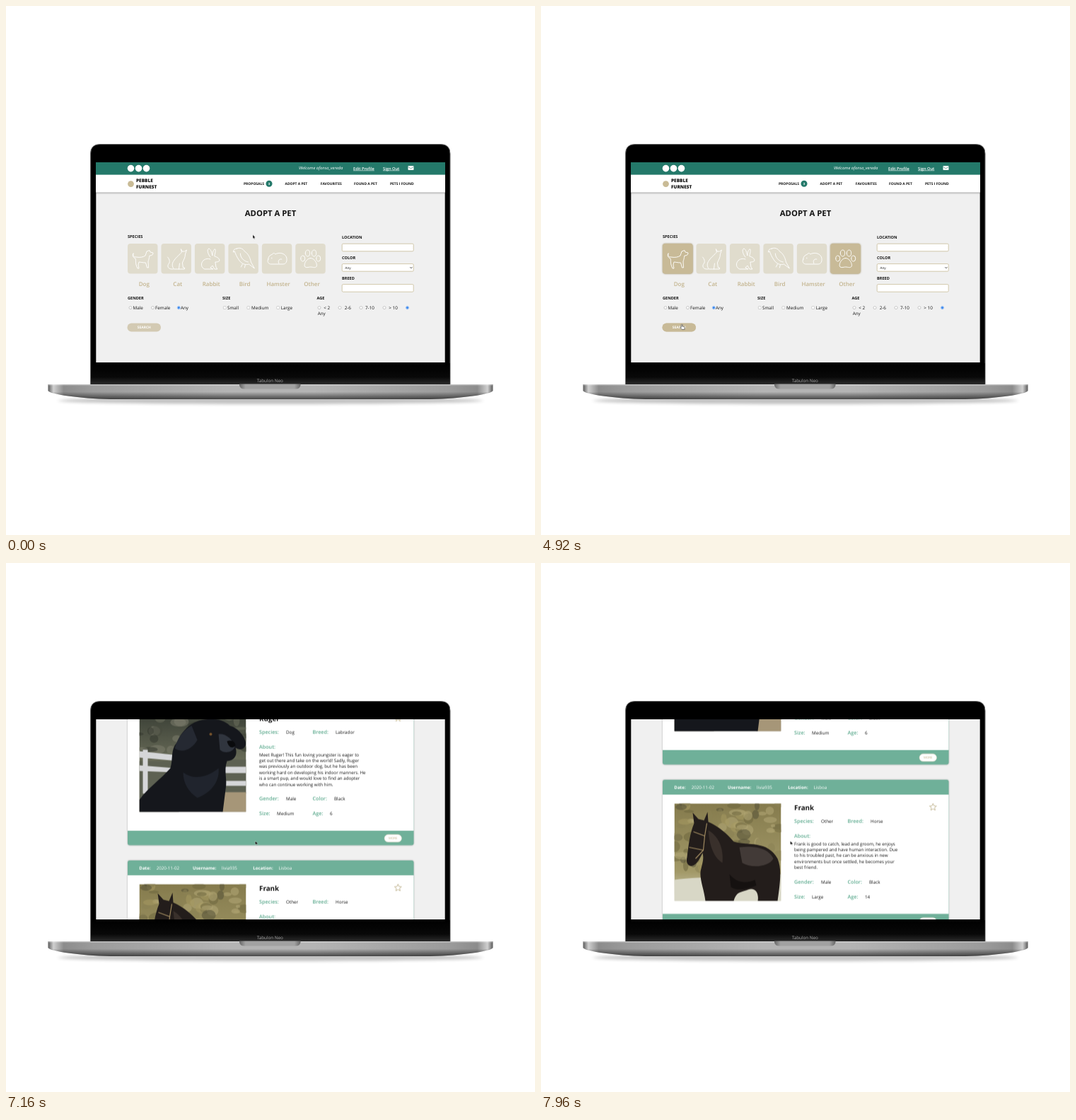
These frames come from a looping animation (748x748 px, 8 s). An HTML page:

```html
<!DOCTYPE html>
<html lang="en">
<head>
<meta charset="utf-8">
<title>Pet search on a laptop</title>
<style>
html, body { margin: 0; width: 100%; height: 100%; overflow: hidden; background: #fff; }
svg { display: block; width: 100vw; height: 100vh; }
text { font-family: "Open Sans", "Noto Sans", sans-serif; fill: #151515; text-rendering: geometricPrecision; }
.b { font-weight: 700; }
.s { font-weight: 600; }
.i { font-style: italic; }
.w { fill: #fff; }
.u { text-decoration: underline; }
.tan { fill: #c3b48e; }
.mint { fill: #62ad92; }
.logo { font-weight: 800; }
.icon { fill: none; stroke: #fff; stroke-width: .9; stroke-linejoin: round; stroke-linecap: round; }
.field { fill: #fff; stroke: #c8bb98; stroke-width: .8; }
.tile { fill: #e0dccd; }
.button { fill: #d3cab3; }
.chosen { fill: #c8ba97; filter: drop-shadow(0 0 1px #9d8f6a); }
.card { filter: drop-shadow(0 .5px 1.2px rgba(0,0,0,.3)); }

.chosen, .hover, .arrow, .hand { animation: 8s step-end infinite; }
.pick0 { animation-name: pick-first; }
.pick5 { animation-name: pick-last; }
.hover { fill: #c8ba97; animation-name: hover; }
.arrow { animation-name: arrow; }
.hand { animation-name: hand; }
.cursor { animation: move 8s ease-in-out infinite; }
.page { animation: scroll 8s linear infinite; }

@keyframes pick-first { 0% { opacity: 0 } 21.5%, 100% { opacity: 1 } }
@keyframes pick-last { 0% { opacity: 0 } 43.5%, 100% { opacity: 1 } }
@keyframes hover { 0% { opacity: 0 } 58.5% { opacity: 1 } 67.5%, 100% { opacity: 0 } }
@keyframes arrow { 0% { opacity: 1 } 12% { opacity: 0 } 51% { opacity: 1 } 58.5% { opacity: 0 } 67.5%, 100% { opacity: 1 } }
@keyframes hand { 0% { opacity: 0 } 12% { opacity: 1 } 51% { opacity: 0 } 58.5% { opacity: 1 } 67.5%, 100% { opacity: 0 } }
@keyframes move {
  0%, 7.5% { transform: translate(349px, 323.5px) }
  19%, 24% { transform: translate(195px, 358px) }
  38%, 46% { transform: translate(436px, 347px) }
  60%, 66% { transform: translate(198.5px, 450px) }
  71%, 100% { transform: translate(352.5px, 393px) }
}
@keyframes scroll {
  0%, 70.6% { transform: translateY(0) }
  75% { transform: translateY(-60px) }
  80% { transform: translateY(-165px) }
  87.5% { transform: translateY(-306px) }
  91.5% { transform: translateY(-372.5px) }
  95.5% { transform: translateY(-429px) }
  99.5%, 100% { transform: translateY(-453.5px) }
}
</style>
</head>
<body>
<svg id="stage" viewBox="0 0 748 748"></svg>
<script>
const text = (x, y, size, cls, str, anchor = 'start') =>
  `<text x="${x}" y="${y}" font-size="${size}" class="${cls}" text-anchor="${anchor}">${str}</text>`;
const rect = (x, y, w, h, r, attrs) =>
  `<rect x="${x}" y="${y}" width="${w}" height="${h}" rx="${r}" ${attrs}/>`;
const circle = (x, y, r, attrs) => `<circle cx="${x}" cy="${y}" r="${r}" ${attrs}/>`;
const path = (d, attrs) => `<path d="${d}" ${attrs}/>`;
const fill = color => `fill="${color}"`;
const line = (color, width) => `fill="none" stroke="${color}" stroke-width="${width}"`;
const each = (list, fn) => list.map(fn).join('');

// Seeded blobs give the photo backdrops their leafy look.
function foliage(seed, count, height, colors) {
  const rnd = () => (seed = (seed * 16807) % 2147483647) / 2147483647;
  return Array.from({ length: count }, (_, i) =>
    `<ellipse cx="${(rnd() * 151).toFixed(1)}" cy="${(rnd() * height).toFixed(1)}" rx="${(3 + rnd() * 9).toFixed(1)}"
      ry="${(2 + rnd() * 6).toFixed(1)}" fill="${colors[i % colors.length]}" opacity=".55"/>`).join('');
}

const species = [
  ['Dog', 'M8 14C7 18 9 19 12 19C18 20 22 19 25 17L27 11L31 9.5L32 12L36 13C36 16 34 17 31 17C30 21 30 23 29 25L29.5 34H27.5L25.5 27C21 27 18 26 16 26L15 30L16 35H14L12 30C11 27 12 24 11 21C8 20 6 17 8 14Z'],
  ['Cat', 'M28 8L29 12C26 16 22 18 18 24C15 28 15 32 18 36H33V34H31L30 27C32 22 34 20 34 15L36 9L33 11H30ZM17 36C9 37 8 31 11 28C13 25 11 21 9 19M25 36L26 28'],
  ['Rabbit', 'M22 19C18 14 17 8 20 7C23 8 24 13 25 17C25 12 27 7 29 8C30 11 28 15 28 18C32 19 35 21 35 24C34 26 31 26 29 26L30 33L32 36H28L25 31L22 34L26 36H14C9 34 8 28 12 24C15 21 19 21 22 22'],
  ['Bird', 'M12 7C16 5 21 7 23 11C28 14 31 20 32 26L37 35L29 29C24 31 18 28 15 23C12 19 10 14 9 11L7 12C7 9 9 7 12 7ZM17 14C17 20 22 25 28 26M20 29L18 33M24 30L23 34'],
  ['Hamster', 'M9 22C9 17 13 16 15 15C16 13 18 13 19 15C24 12 33 13 35 20C36 25 34 29 30 29H13C9 29 7 25 9 22ZM24 28C22 24 25 21 28 22M14 20V21'],
  ['Other', 'M7.5 21a3 4 0 1 0 6 0a3 4 0 1 0-6 0M14 13.5a3.2 4.5 0 1 0 6.4 0a3.2 4.5 0 1 0-6.4 0M23 13.5a3.2 4.5 0 1 0 6.4 0a3.2 4.5 0 1 0-6.4 0M29.5 21a3 4 0 1 0 6 0a3 4 0 1 0-6 0M21.5 20.5C16 20.5 12 28 13 32C15 35 18 33 21.5 33C25 33 28 35 30 32C31 28 27 20.5 21.5 20.5Z'],
];

function tile([name, icon], i) {
  const chosen = i === 0 || i === 5 ? rect(0, 0, 42.5, 42.5, 4, `class="chosen pick${i}"`) : '';
  return `<g transform="translate(${172 + 47.45 * i} 336)">${rect(0, 0, 42.5, 42.5, 4, 'class="tile"')}
    ${chosen}${path(icon, 'class="icon"')}</g>` + text(195.3 + 47.45 * i, 395.8, 8, 's tan', name, 'middle');
}

const radio = (x, on) =>
  circle(x, 426.6, 2, `fill="#fff" stroke="${on ? '#1a73e8' : '#999'}" stroke-width=".5"`) +
  (on ? circle(x, 426.6, 1.3, fill('#1a73e8')) : '');

const header =
  rect(127, 221, 494, 42.5, 0, 'fill="#fff" style="filter:drop-shadow(0 1px 1.2px rgba(0,0,0,.35))"') +
  rect(127, 221, 494, 17.6, 0, fill('#24796a')) +
  each([176.5, 187.5, 198.5], x => circle(x, 229.6, 4.8, fill('#fff'))) +
  text(414, 231.2, 5.9, 'i w', 'Welcome afonso_vereda') +
  text(491, 231.6, 5.7, 's w u', 'Edit Profile') +
  text(533, 231.6, 5.7, 's w u', 'Sign Out') +
  rect(568.5, 226, 8, 6, .8, fill('#fff')) +
  path('M568.7 227.3L572.5 230L576.3 227.3', line('#24796a', .6)) +
  circle(176.5, 251.6, 4.4, fill('#c9bb96')) +
  text(184, 249.4, 6.5, 'logo', 'PEBBLE') + text(184, 257.8, 6.5, 'logo', 'FURNEST') +
  each([[336, 'PROPOSALS'], [394.5, 'ADOPT A PET'], [444.8, 'FAVOURITES'], [492, 'FOUND A PET'], [543, 'PETS I FOUND']],
    ([x, s]) => text(x, 253, 4.95, 'b', s)) +
  circle(372, 251.2, 4.5, fill('#24796a')) + text(372, 252.8, 4.4, 'b w', '3', 'middle');

const form =
  text(374, 297.3, 11.3, 'b', 'ADOPT A PET', 'middle') +
  each([[172, 328.4, 'SPECIES'], [475, 329, 'LOCATION'], [475, 357.6, 'COLOR'], [475, 387, 'BREED'],
    [172, 415, 'GENDER'], [306, 415, 'SIZE'], [439.5, 415, 'AGE']], ([x, y, s]) => text(x, y, 5.6, 'b', s)) +
  each(species, tile) +
  each([336.2, 364.6, 393.6], y => rect(475.2, y, 101, 10.6, 1.5, 'class="field"')) +
  text(479.5, 371.7, 4.7, '', 'Any') +
  path('M571.4 369.2L572.9 370.8L574.4 369.2', line('#222', .8)) +
  each([176, 207.5, 443, 472, 502, 535], x => radio(x)) + radio(244.3, true) + radio(567.5, true) +
  each([309.3, 342.8, 384.7], x => rect(x - 1.9, 424.7, 3.8, 3.8, .6, 'fill="#fff" stroke="#aaa" stroke-width=".5"')) +
  each([[179.5, 'Male'], [211, 'Female'], [247, 'Any'], [313, 'Small'], [347, 'Medium'], [388.7, 'Large'],
    [449.3, '&lt; 2'], [478.7, '2-6'], [508, '7-10'], [541.3, '&gt; 10']], ([x, s]) => text(x, 428.9, 6.3, '', s)) +
  text(440.7, 437.2, 6.3, '', 'Any') +
  rect(171.5, 448.6, 47.5, 12, 6, 'class="button"') + rect(171.5, 448.6, 47.5, 12, 6, 'class="hover"') +
  text(195.3, 456.4, 4.9, 'b w', 'SEARCH', 'middle');

const dogPhoto =
  rect(0, 0, 151, 138, 0, 'fill="url(#hedge)"') +
  foliage(11, 60, 62, ['#33382f', '#6b6e5c', '#474c3e', '#7c7d6c']) +
  path('M0 66H56V138H0ZM118 64H151V112H118Z', fill('#5d6152')) +
  path('M0 52L56 58V66L0 61ZM0 72L50 76V82L0 80ZM118 74H151V83H118ZM118 94H151V101H118ZM5 50H12V112H5Z', fill('#d5d6d8')) +
  path('M116 110H151V138H116Z', fill('#a69678')) +
  path('M0 138V121C12 104 30 92 44 76C48 62 44 50 53 40C58 28 68 14 84 9C100 4 118 6 128 16C140 19 150 32 151 42C148 52 140 50 136 47C139 56 136 65 124 66C119 80 125 92 122 106L118 138Z', fill('#15171c')) +
  path('M74 16C62 22 54 34 50 48C62 56 76 48 82 36Z', fill('#252932')) +
  path('M112 28C120 26 132 34 135 46C132 54 120 56 114 50Z', fill('#30353e')) +
  path('M124 38C130 35 136 39 136 44C132 49 126 47 124 38Z', fill('#0a0b0d')) +
  circle(101, 28, 2, fill('#75532c')) +
  path('M62 82C78 94 98 88 112 76C114 92 104 110 82 118C70 110 62 98 62 82Z', fill('#20242d'));

const horsePhoto =
  rect(0, 0, 151, 138, 0, 'fill="url(#meadow)"') +
  foliage(29, 90, 96, ['#6d673f', '#b3a877', '#8b8154', '#57533a', '#a79a62']) +
  path('M0 108C40 102 110 106 151 100V138H0Z', fill('#d8d7c6')) +
  path('M28 28L26 13L34 22L42 24L47 12L48 26C62 32 76 44 84 54C104 60 132 52 146 78C152 92 150 110 146 138H118C120 126 114 118 104 122C94 126 88 124 84 138H44C42 120 34 104 38 92C40 84 42 78 40 70C36 78 32 86 26 88C20 90 16 84 18 76C20 60 22 42 28 28Z', fill('#231d1b')) +
  path('M48 38C62 46 70 62 68 84C58 78 50 64 48 38Z', fill('#39302b')) +
  path('M92 62C112 60 132 62 140 78C134 90 108 92 96 84Z', fill('#423a37')) +
  path('M78 100C88 112 100 114 114 108L116 116C102 122 88 124 80 118Z', fill('#151110')) +
  path('M27 40L43 46L41 66L21 62M43 46L46 28M41 66L30 78', line('#a08a60', 1.2));

const details = (y, rows) =>
  each(rows, ([x, label, vx, value]) => text(x, y, 7.2, 's mint', label) + text(vx, y, 6.3, '', value));

function card(top, pet) {
  const shift = (pet.about.length - 6) * 8.4;
  const foot = 198 + shift;
  const star = Array.from({ length: 10 }, (_, i) => {
    const r = i % 2 ? 2.4 : 5.2, a = i * Math.PI / 5;
    return `${(554.3 + r * Math.sin(a)).toFixed(2)},${(38.8 - r * Math.cos(a)).toFixed(2)}`;
  }).join(' ');
  return `<g transform="translate(0 ${top})">` +
    rect(172, 0, 404.5, foot + 20.5, 3, 'class="card" fill="#6fb099"') +
    rect(172, 21, 404.5, foot - 21, 0, fill('#fff')) +
    each([[188.3, 'Date:'], [264, 'Username:'], [pet.locX, 'Location:']], ([x, s]) => text(x, 13.3, 6.2, 'b w', s)) +
    each([[212.7, pet.date], [305, pet.user], [pet.locX + 36.3, pet.place]], ([x, s]) => text(x, 13.3, 6.2, 'w', s)) +
    `<svg x="188.5" y="33.5" width="151" height="138">${pet.photo}</svg>` +
    text(358, 43.4, 9.8, 'b', pet.name) +
    `<polygon points="${star}" ${line('#b9ab82', .8)} stroke-linejoin="round"/>` +
    details(61, [[358, 'Species:', 396, pet.species], [433.5, 'Breed:', 466, pet.breed]]) +
    text(358, 81.8, 7.2, 's mint', 'About:') +
    each(pet.about, (s, i) => text(358, 92.7 + 8.36 * i, 6.22, '', s)) +
    details(155.4 + shift, [[358, 'Gender:', 396, 'Male'], [433.5, 'Color:', 464, 'Black']]) +
    details(176 + shift, [[358, 'Size:', 383, pet.size], [433.5, 'Age:', 458, pet.age]]) +
    rect(535, foot + 5.3, 24.5, 10.8, 5.4, 'fill="#fff" stroke="#d8cfb8" stroke-width=".5"') +
    text(547.2, foot + 12.3, 4.4, 'tan', 'MORE', 'middle') + '</g>';
}

const ruger = {
  name: 'Ruger', date: '2020-10-21', user: 'telmo482', place: 'Viseu', locX: 353, species: 'Dog', breed: 'Labrador',
  size: 'Medium', age: '6', photo: dogPhoto,
  about: ['Meet Ruger! This fun loving youngster is eager to', 'get out there and take on the world! Sadly, Ruger',
    'was previously an outdoor dog, but he has been', 'working hard on developing his indoor manners. He',
    'is a smart pup, and would love to find an adopter', 'who can continue working with him.'],
};
const frank = {
  name: 'Frank', date: '2020-11-02', user: 'livia935', place: 'Lisboa', locX: 349.2, species: 'Other', breed: 'Horse',
  size: 'Large', age: '14', photo: horsePhoto,
  about: ['Frank is good to catch, lead and groom, he enjoys', 'being pampered and have human interaction. Due',
    'to his troubled past, he can be anxious in new', 'environments but once settled, he becomes your', 'best friend.'],
};

const gradient = (id, dir, stops) =>
  `<linearGradient id="${id}" ${dir}>${each(stops, ([at, color, alpha = 1]) =>
    `<stop offset="${at}" stop-color="${color}" stop-opacity="${alpha}"/>`)}</linearGradient>`;
const down = 'x2="0" y2="1"';

const defs = `<defs>
  <clipPath id="screen">${rect(127.3, 221, 493.4, 283, 0, '')}</clipPath>
  <filter id="soft" x="-10%" y="-200%" width="120%" height="500%"><feGaussianBlur stdDeviation="3 2"/></filter>
  ${gradient('hedge', down, [[0, '#3c4137'], [.45, '#666956'], [1, '#7d7763']])}
  ${gradient('meadow', down, [[0, '#857b4d'], [.7, '#a29968'], [1, '#d3d0b8']])}
  ${gradient('metal', '', [[0, '#5a5a5a'], [.012, '#d0d0d0'], [.035, '#8c8c8c'], [.1, '#9b9b9b'], [.4, '#b4b4b4'],
    [.6, '#b4b4b4'], [.9, '#9b9b9b'], [.965, '#8c8c8c'], [.988, '#d0d0d0'], [1, '#5a5a5a']])}
  ${gradient('edge', down, [[0, '#fff', .45], [.12, '#fff', 0], [.5, '#000', 0], [1, '#000', .6]])}
  ${gradient('notch', '', [[0, '#666'], [.1, '#a2a2a2'], [.9, '#a2a2a2'], [1, '#666']])}
  ${gradient('chin', down, [[0, '#000'], [.65, '#080808'], [1, '#2b2b2b']])}
</defs>`;

const base = 'M59.5 535H688.5V544C686 549 645 555 600 556H148C103 555 62 549 59.5 544Z';
const laptop =
  `<ellipse cx="374" cy="558" rx="300" ry="5" fill="#000" opacity=".24" filter="url(#soft)"/>` +
  path('M119.5 535V209Q119.5 195.5 133 195.5H614.5Q628 195.5 628 209V535Z', 'fill="#000" stroke="#6b6b6b" stroke-width="1"') +
  rect(120, 505, 507.5, 30, 0, 'fill="url(#chin)"') +
  path(base, 'fill="url(#metal)"') + path(base, 'fill="url(#edge)"') +
  path('M330 534.5H416.5V536Q416 541.5 409 541.5H337.5Q330.5 541.5 330 536Z', 'fill="url(#notch)"') +
  `<text x="373.3" y="532.4" font-size="6.3" text-anchor="middle" style="fill:#a8a8a8">Tabulon Neo</text>`;

const cursor = `<g class="cursor">
  ${path('M0 0V5.2L1.2 4.2L2 6L2.9 5.6L2.1 3.9H3.6Z', 'class="arrow" fill="#000" stroke="#fff" stroke-width=".35"')}
  ${path('M0 .6C.6-.3 1.4 0 1.5.8V3L4 3.6C4.8 4 4.8 5 4.3 7.4H.8L-1.6 4.6C-1.4 3.6-.6 3.8 0 4.5Z', 'class="hand" fill="#fff" stroke="#222" stroke-width=".6"')}
</g>`;

document.getElementById('stage').innerHTML = defs + laptop +
  `<g clip-path="url(#screen)">${rect(127, 221, 494, 283, 0, fill('#f0f0f0'))}
    <g class="page">${header}${form}${card(520, ruger)}${card(760, frank)}</g>${cursor}</g>`;
</script>
</body>
</html>
```
